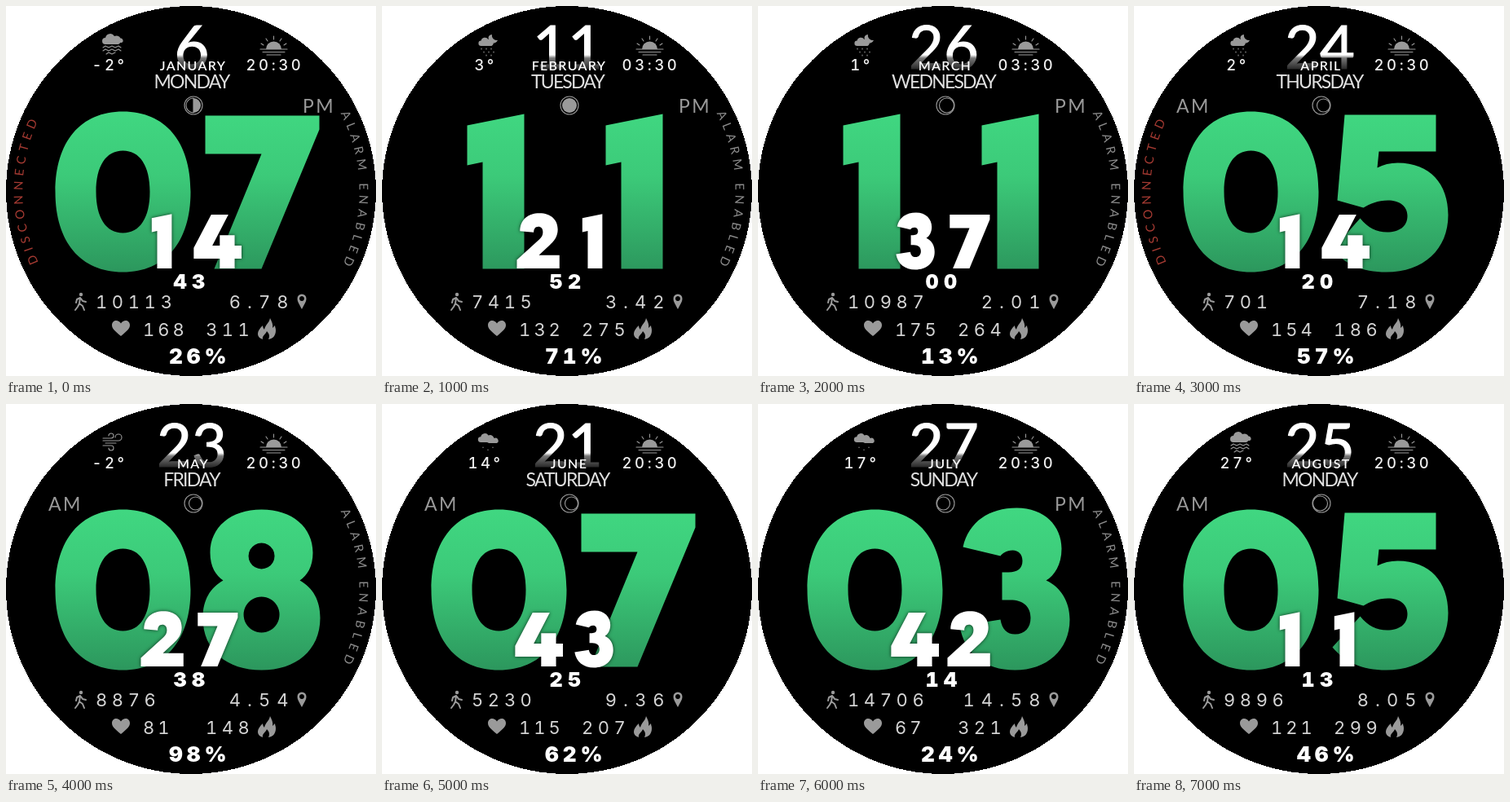
An HTML page that plays this animation: 454 px wide and 454 px high, repeating every 8000 ms.

```html
<!DOCTYPE html>
<html lang="en">
<head>
<meta charset="utf-8">
<title>Watch face</title>
<style>
html, body { margin: 0; width: 100%; height: 100%; overflow: hidden; background: #fff; }
svg { display: block; width: 100vw; height: 100vh; }
text { font-family: Inter, sans-serif; font-size: 22px; fill: #d4d4d4; font-variant-numeric: tabular-nums; }
.mid { text-anchor: middle; }
.end { text-anchor: end; }
#date { font: 400 74px Lato, sans-serif; fill: url(#fade); stroke: url(#fade); stroke-width: 1.2px; }
#month { font: 600 16px Lato, sans-serif; letter-spacing: 1.3px; fill: #fff; }
#day { font: 400 23px Lato, sans-serif; letter-spacing: -1.8px; fill: #e0e0e0; }
#temp, #sun { font-size: 18.5px; font-weight: 500; letter-spacing: 3.6px; fill: #f0f0f0; }
#steps { letter-spacing: 5.6px; }
#dist { letter-spacing: 8px; }
#pulse { letter-spacing: 4px; }
#kcal { letter-spacing: 5.5px; }
#sec { font-size: 25px; font-weight: 900; letter-spacing: 6.5px; fill: #fff; }
#batt { font-size: 26px; font-weight: 900; letter-spacing: 5px; fill: #fff; }
.half { font: 400 23px Lato, sans-serif; letter-spacing: 2.5px; fill: #999; }
.arc { font: 400 15px Lato, sans-serif; letter-spacing: 5.7px; fill: #8c8c8c; }
#off { fill: #a53a32; }
.icon { fill: #9a9a9a; stroke: none; }
.line { fill: none; stroke: #9a9a9a; stroke-width: 1.1; stroke-linecap: round; stroke-linejoin: round; }
#hours { fill: url(#green); }
#mins { fill: #fff; filter: drop-shadow(0 0 2px rgba(0, 0, 0, .7)); }
</style>
</head>
<body>
<svg viewBox="0 0 454 454">
  <defs>
    <linearGradient id="green" gradientUnits="userSpaceOnUse" x1="0" y1="-193" x2="0" y2="4">
      <stop offset="0" stop-color="#40d781"/>
      <stop offset=".4" stop-color="#3cca79"/>
      <stop offset="1" stop-color="#2c975d"/>
    </linearGradient>
    <linearGradient id="fade" gradientUnits="userSpaceOnUse" x1="0" y1="23" x2="0" y2="79">
      <stop offset=".66" stop-color="#fff"/>
      <stop offset=".73" stop-color="#777"/>
      <stop offset="1" stop-color="#202020"/>
    </linearGradient>
    <path id="leftArc" d="M81 373.400A207 207 0 0 1 81 80.600"/>
    <path id="rightArc" d="M373 80.600A207 207 0 0 1 373 373.400"/>
    <path id="cloud" class="icon" d="M-8 0a4 4 0 0 1 0-8a6 6 0 0 1 11-2a5 5 0 0 1 5 10z"/>
    <path id="moonlet" class="icon" d="M-2-11a6 6 0 0 0 11 5a6 6 0 0 1-7-7a6 6 0 0 0-4 2z"/>
    <g id="storm">
      <use href="#cloud"/><use href="#cloud" transform="translate(8 -2) scale(.5)"/>
      <path class="line" d="M-11 4l3-2 4 2 4-2 4 2 4-2 3 2M-11 8l3-2 4 2 4-2 4 2 4-2 3 2M-7 12l3-2 4 2 4-2"/>
    </g>
    <g id="night">
      <use href="#moonlet" transform="translate(3 1)"/>
      <use href="#cloud" transform="translate(-2 2) scale(.8)"/>
      <path class="line" d="M-8 5v1M-2 5v1M4 5v1M-5 9v1M1 9v1M7 9v1M-2 13v1M4 13v1"/>
    </g>
    <path id="wind" class="line" d="M-11-5H-1a3 3 0 1 0-3-3M-11-2H8a4 4 0 1 0-4-4M-8 1H5M-11 4H-1a3 3 0 1 1-3 3"/>
    <g id="snow">
      <use href="#cloud" transform="translate(-2 0) scale(.85)"/><use href="#cloud" transform="translate(6 1) scale(.6)"/>
      <path class="line" stroke-width="2" d="M-6 6v.5M6 6v.5M0 9v.5"/>
    </g>
  </defs>

  <circle cx="227" cy="227" r="227" shape-rendering="crispEdges"/>

  <use id="sky" x="130" y="47"/>
  <text id="temp" class="mid" x="127" y="79"/>
  <path class="icon" d="M319 53a9.500 9.500 0 0 1 19 0z"/>
  <path class="line" d="M312 53h33M315 56.500h27M320 60h17M328.500 37v4M319 40l2 3M338 40l-2 3M313 46l3 2M344 46l-3 2"/>
  <text id="sun" class="mid" x="330" y="79"/>

  <text id="date" class="mid" x="228" y="77"/>
  <text id="month" class="mid" x="229.500" y="79"/>
  <text id="day" class="mid" x="227.500" y="101"/>
  <g id="moon" transform="translate(230 122)"></g>

  <text id="am" class="half" x="52" y="131">AM</text>
  <text id="pm" class="half" x="364" y="131">PM</text>
  <text id="off" class="arc mid"><textPath href="#leftArc" startOffset="50.500%">DISCONNECTED</textPath></text>
  <text id="alarm" class="arc mid"><textPath href="#rightArc" startOffset="49.800%">ALARM ENABLED</textPath></text>

  <g id="hours" role="img"></g>
  <g id="mins" role="img"></g>
  <text id="sec" x="205.500" y="347"/>

  <circle class="icon" cx="92" cy="354" r="2.200"/>
  <path class="line" style="stroke-width:2" d="M91 358l-1 7 4 3 2 5M90 365l-2 4-3 4M91 358l-4 2-1 4M92 359l2 3 4 1"/>
  <text id="steps" x="110" y="371"/>
  <text id="dist" class="end" x="354.500" y="371"/>
  <path class="icon" fill-rule="evenodd" d="M363 372c-3-6-5.500-9-5.500-13a5.500 5.500 0 0 1 11 0c0 4-2.500 7-5.500 13zM363 356a3 3 0 1 0 .01 0z"/>
  <path class="icon" d="M141 405c-7-6-11-9-11-13.500c0-6.500 8-7.500 11-2c3-5.500 11-4.500 11 2c0 4.500-4 7.500-11 13.500z"/>
  <text id="pulse" x="168" y="405"/>
  <text id="kcal" x="245" y="405"/>
  <path class="icon" d="M324 383c-1 6-6 8-7 14c-1-1-2-3-2-5c-4 4-6 7-6 10c0 4 3 6 6 7c-1-5 4-6 5-10c3 3 4 6 2 10c6-1 9-5 9-11c0-3-1-4-1-6l-3 3c1-4-1-8-3-12z"/>
  <text id="batt" x="200" y="439"/>
</svg>
<script>
// Heavy digits: centred on x = 0, baseline at y = 0.
const glyphs = {
  0: 'M0-193C52-193 83-156 83-94.500S52 4 0 4-83-33-83-94.500-52-193 0-193ZM0-145C-21-145-33-126-33-94.500S-21-44 0-44 33-63 33-94.500 21-145 0-145Z',
  1: 'M-39-176L31-190V0H-20V-131L-39-127Z',
  2: 'M-66-130C-66-170-38-193 2-193C42-193 66-170 66-136C66-112 54-96 36-80L0-46H72V0H-77V-30L2-102C10-110 14-116 14-127C14-139 8-146-2-146C-13-146-18-138-18-126Z',
  3: 'M-62-147C-55-178-30-195 4-195C38-195 59-173 59-145C59-125 50-112 40-106C58-98 69-80 69-58C69-20 40 4 2 4C-36 4-60-16-66-50L-16-58C-14-46-8-40 2-40C14-40 21-48 21-60C21-74 12-82-4-82H-14V-116H-6C5-116 11-121 11-130C11-138 6-143-1-143C-9-143-14-139-16-136Z',
  4: 'M-22-188H38L-18-80H8V-116H60V-80H84V-34H60V0H8V-34H-83V-72Z',
  5: 'M-55-189H57V-144H-13L-15-124Q-4-130 10-130C50-130 72-104 72-66C72-24 42 4-4 4C-34 4-55-6-70-24L-36-62C-26-50-16-45-3-45C12-45 22-52 22-65C22-77 12-84-2-84C-14-84-24-80-32-75L-64-84Z',
  7: 'M-69-188H71V-171L0 0H-58L0-141H-69Z',
  8: 'M0-193C38-193 63-171 63-140C63-123 56-112 47-106C63-97 72-82 72-60C72-20 42 4 0 4S-72-20-72-60C-72-82-63-97-47-106C-56-112-63-123-63-140C-63-171-38-193 0-193ZM0-152A16 16 0 1 0 .1-152ZM0-86A22 22 0 1 0 .1-86Z'
};

const keys = ['date', 'month', 'day', 'sky', 'temp', 'sun', 'moon', 'half', 'hours', 'mins',
  'sec', 'steps', 'dist', 'pulse', 'kcal', 'batt', 'off', 'alarm'];
const faces = [
  '6 JANUARY MONDAY storm -2° 20:30 half PM 07 14 43 10113 6.78 168 311 26% 1 1',
  '11 FEBRUARY TUESDAY night 3° 03:30 full PM 11 21 52 7415 3.42 132 275 71% 0 1',
  '26 MARCH WEDNESDAY night 1° 03:30 1.5 PM 11 37 00 10987 2.01 175 264 13% 0 1',
  '24 APRIL THURSDAY night 2° 20:30 2.5 AM 05 14 20 701 7.18 154 186 57% 1 0',
  '23 MAY FRIDAY wind -2° 20:30 2.5 AM 08 27 38 8876 4.54 81 148 98% 0 1',
  '21 JUNE SATURDAY snow 14° 20:30 2.5 AM 07 43 25 5230 9.36 115 207 62% 0 0',
  '27 JULY SUNDAY snow 17° 20:30 -2.5 PM 03 42 14 14706 14.58 67 321 24% 0 1',
  '25 AUGUST MONDAY storm 27° 20:30 -1.5 AM 05 11 13 9896 8.05 121 299 46% 0 0'
].map(row => Object.fromEntries(row.split(' ').map((v, i) => [keys[i], v])));

const $ = id => document.getElementById(id);
const show = (id, on) => $(id).setAttribute('visibility', on ? 'visible' : 'hidden');

function drawDigits(id, value, x, y, step, scale) {
  $(id).setAttribute('aria-label', value);
  $(id).innerHTML = [...value].map((d, i) =>
    `<path fill-rule="evenodd" transform="translate(${x + i * step} ${y}) scale(${scale})" d="${glyphs[d]}"/>`).join('');
}

function moonShape(phase) {
  const ring = '<circle class="line" r="11"/>';
  if (phase === 'half') return ring + '<path class="icon" d="M0-9A9 9 0 0 1 0 9Z"/><path class="line" d="M0-9A9 9 0 0 0 0 9Z"/>';
  if (phase === 'full') return ring + '<circle class="icon" r="9"/>';
  return ring + `<circle class="line" cx="${phase}" r="${10.5 - Math.abs(phase)}"/>`;
}

function render(f) {
  for (const id of ['date', 'month', 'day', 'temp', 'sun', 'sec', 'steps', 'dist', 'pulse', 'kcal', 'batt'])
    $(id).textContent = f[id];
  $('sky').setAttribute('href', '#' + f.sky);
  $('moon').innerHTML = moonShape(f.moon);
  drawDigits('hours', f.hours, 143.5, 322.5, 170, 1);
  drawDigits('mins', f.mins, 192.5, 322, 67, .351);
  show('am', f.half === 'AM');
  show('pm', f.half === 'PM');
  show('off', f.off === '1');
  show('alarm', f.alarm === '1');
}

let current = -1;
const start = performance.now();
function tick() {
  const i = Math.floor((performance.now() - start) / 1000) % faces.length;
  if (i !== current) render(faces[current = i]);
  requestAnimationFrame(tick);
}
tick();
</script>
</body>
</html>
```
